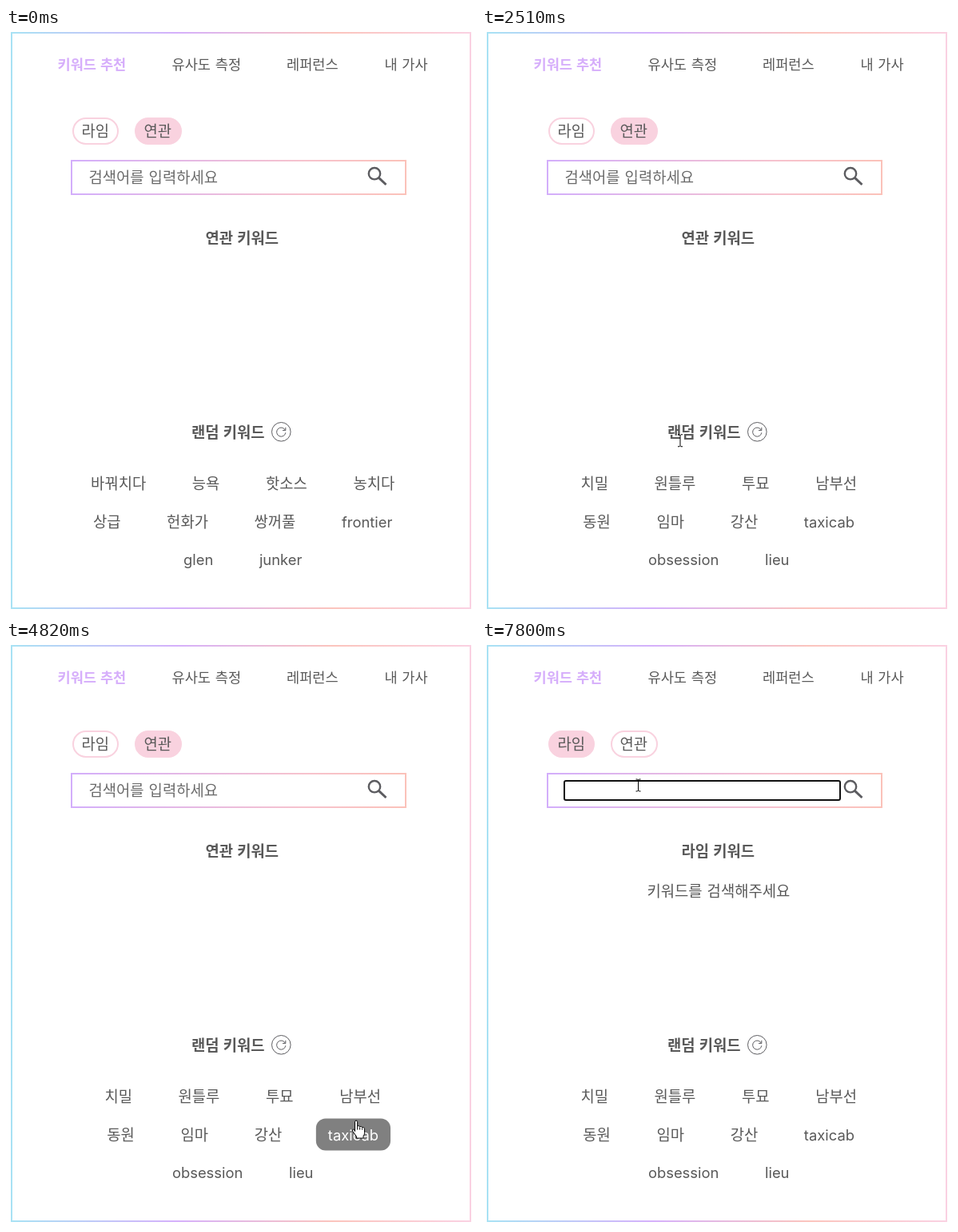
An HTML page for the animation above (8000 ms loop, 588 px wide and 732 px high).

```html
<!DOCTYPE html>
<html lang="ko">
<head>
<meta charset="utf-8">
<style>
html, body { margin: 0; width: 100%; height: 100%; overflow: hidden; background: #fff; }
svg { display: block; }
text { font: 18.8px Inter, "Noto Sans CJK KR", "Noto Sans CJK", sans-serif; word-spacing: .7px; fill: #595959; white-space: pre; }
.nav text { font-size: 17.6px; }
.bold { font-weight: 700; }
.latin { font-size: 18.4px; }
.nav .on { font-weight: 700; fill: #d6aefb; }
.tab { fill: #fff; stroke: #f9d2df; stroke-width: 2; }
.tab.on { fill: #f9d2df; }
.pill { fill: #808080; visibility: hidden; }
.hover .pill { visibility: visible; }
.hover text { fill: #fff; }
.line { fill: none; stroke: #5c5c60; }
.cursor path { fill: #fff; stroke: #000; stroke-linejoin: round; }
</style>
</head>
<body>
<svg width="588" height="732" viewBox="0 0 588 732">
  <defs>
    <linearGradient id="frame" gradientUnits="userSpaceOnUse" x1="6" x2="582" y1="0" y2="0">
      <stop stop-color="#a8e2f4"/><stop offset=".36" stop-color="#d5b0fb"/>
      <stop offset=".7" stop-color="#fbc4bd"/><stop offset="1" stop-color="#fad1e2"/>
    </linearGradient>
    <linearGradient id="box" gradientUnits="userSpaceOnUse" x1="81" x2="501" y1="0" y2="0">
      <stop stop-color="#d3aefb"/><stop offset=".7" stop-color="#f7c3cd"/><stop offset="1" stop-color="#fbc2b9"/>
    </linearGradient>
  </defs>
  <rect x="7" y="6" width="574" height="720" fill="none" stroke="url(#frame)" stroke-width="2"/>
  <g class="nav">
    <text class="on" x="64.5" y="52">키워드 추천</text>
    <text x="207.5" y="52">유사도 측정</text>
    <text x="351" y="52">레퍼런스</text>
    <text x="473.5" y="52">내 가사</text>
  </g>
  <rect class="tab" x="84" y="113" width="56" height="32" rx="16"/>
  <rect class="tab" x="162" y="113" width="57" height="32" rx="16"/>
  <text x="94.5" y="136">라임</text>
  <text x="172.5" y="136">연관</text>
  <rect x="82" y="166" width="418" height="42" fill="none" stroke="url(#box)" stroke-width="2"/>
  <text id="hint" x="103.5" y="194" style="fill:#6b6b6b">검색어를 입력하세요</text>
  <g id="focus">
    <rect x="103" y="175" width="345" height="24" rx="2" fill="#fff" stroke="#101010" stroke-width="2"/>
    <path id="caret" d="M104.5 176V198" stroke="#222"/>
  </g>
  <g class="line" stroke-width="2.4">
    <circle cx="461" cy="182.2" r="7.2"/>
    <path d="M466.3 187.3L475.5 196" stroke-width="3"/>
  </g>
  <text id="title" class="bold" x="249.5" y="270"></text>
  <text id="note" x="206.5" y="320">키워드를 검색해주세요</text>
  <text class="bold" x="232" y="513">랜덤 키워드</text>
  <g class="line">
    <circle cx="344.3" cy="505.3" r="11.8"/>
    <path d="M349.3 503.2A5.6 5.6 0 1 0 349.8 506.3M349.8 499.8V503.6H346"/>
  </g>
  <g id="words"></g>
  <g class="cursor">
    <path id="arrow" d="M.5 .5V16.2L4.1 12.8L6.7 18.6L9.1 17.5L6.5 11.9H11.6Z"/>
    <path id="hand" d="M-1.5 14V2Q-1.5 .5 0 .5T1.6 2V8Q1.8 6.8 3.2 7T4.6 8.6Q5 7.6 6.3 7.9T7.6 9.5Q8.2 8.7 9.3 9.1T10.5 11V16Q10.5 18 9 20V22.5H.5V20.5L-4.2 14Q-5.2 12 -3.8 11.4T-1.5 14ZM1.6 8V12M4.6 9V12M7.6 10V12"/>
    <path id="beam" d="M-3 -7.5H-1L0 -6.5L1 -7.5H3M0 -6.5V6.5M-3 7.5H-1L0 6.5L1 7.5H3" style="fill:none"/>
  </g>
</svg>
<script>
const LOOP = 8000, CENTER = 296.2, GAP = 57.6, PAD = 15;
const $ = id => document.getElementById(id);
const sets = [
  '바꿔치다 능욕 핫소스 농치다/상급 헌화가 쌍꺼풀 frontier/glen junker',
  '볼펜 명선 맵시 어렴성/크레용 향료 자치 servitude/stock-in-trade steel',
  '치밀 원틀루 투묘 남부선/동원 임마 강산 taxicab/obsession lieu'
];

// Pointer path: time, x, y
const path = [
  [0, 560, 780], [175, 545, 760], [190, 516, 722], [390, 400, 606], [590, 307, 497], [850, 352, 506],
  [2310, 352, 506], [2510, 248.5, 516], [2700, 148, 562], [3060, 142, 618],
  [3130, 150, 620], [3410, 258, 627], [3480, 262, 633], [3600, 300, 618], [3740, 340, 592], [3880, 343, 578],
  [3950, 344, 582], [4220, 347, 607], [4480, 370, 615], [4750, 432, 619], [4820, 438, 600], [4890, 442, 572],
  [5150, 442, 572], [5880, 133, 142], [5970, 113, 119], [6140, 122, 133],
  [6670, 122, 133], [6750, 198.5, 173.5], [7080, 198.5, 173.5], [7150, 195.5, 180.5], [LOOP, 195.5, 180.5]
];
const handAreas = [[332, 493, 25, 25], [84, 113, 56, 28], [162, 113, 57, 32]];
const beamAreas = [[232, 494, 93, 26], [250, 251, 92, 25], [102, 164, 347, 36]];

function add(parent, tag, attrs) {
  const el = document.createElementNS('http://www.w3.org/2000/svg', tag);
  for (const k in attrs) el.setAttribute(k, attrs[k]);
  return parent.appendChild(el);
}

function layRow(parent, row, i) {
  const y = 577 + 47.5 * i;
  const items = row.split(' ').map(word => {
    const g = add(parent, 'g', {});
    const pill = add(g, 'rect', { class: 'pill', y: y - 27, height: 40, rx: 12 });
    const label = add(g, 'text', { y, class: /[a-z]/.test(word) ? 'latin' : '' });
    label.textContent = word;
    return { g, pill, label, w: label.getComputedTextLength() };
  });
  let x = CENTER - (items.reduce((sum, it) => sum + it.w + GAP, -GAP)) / 2;
  return items.map(({ g, pill, label, w }) => {
    const area = [x - PAD, y - 27, w + 2 * PAD, 40];
    pill.setAttribute('x', area[0]);
    pill.setAttribute('width', area[2]);
    label.setAttribute('x', x);
    x += w + GAP;
    return { g, area };
  });
}

const groups = sets.map(set => {
  const el = add($('words'), 'g', {});
  return { el, items: set.split('/').flatMap((row, i) => layRow(el, row, i)) };
});
const tabs = document.querySelectorAll('.tab');
const show = (el, on) => { el.style.display = on ? '' : 'none'; };

function pointer(t) {
  const i = path.findIndex(p => p[0] > t);
  const [t0, x0, y0] = path[i - 1], [t1, x1, y1] = path[i];
  const k = (t - t0) / (t1 - t0);
  return [x0 + (x1 - x0) * k, y0 + (y1 - y0) * k];
}

function draw(t) {
  const [x, y] = pointer(t);
  const over = ([ax, ay, w, h]) => x >= ax && x <= ax + w && y >= ay && y <= ay + h;
  const current = t < 1380 ? 0 : t < 2170 ? 1 : 2;
  let hand = handAreas.some(over);
  groups.forEach(({ el, items }, i) => {
    show(el, i === current);
    if (i !== current) return;
    for (const { g, area } of items) {
      const hit = over(area);
      g.classList.toggle('hover', hit);
      hand = hand || hit;
    }
  });

  const rhyme = t >= 6290, focused = t >= 7290;
  tabs[0].classList.toggle('on', rhyme);
  tabs[1].classList.toggle('on', !rhyme);
  $('title').textContent = rhyme ? '라임 키워드' : '연관 키워드';
  show($('note'), rhyme);
  show($('hint'), !focused);
  show($('focus'), focused);
  show($('caret'), t < 7800);

  const shape = hand ? 'hand' : beamAreas.some(over) ? 'beam' : 'arrow';
  for (const id of ['arrow', 'hand', 'beam']) {
    show($(id), id === shape);
    $(id).setAttribute('transform', `translate(${x} ${y})`);
  }
}

const start = performance.now();
function tick() {
  draw((performance.now() - start) % LOOP);
  requestAnimationFrame(tick);
}
tick();
</script>
</body>
</html>
```
